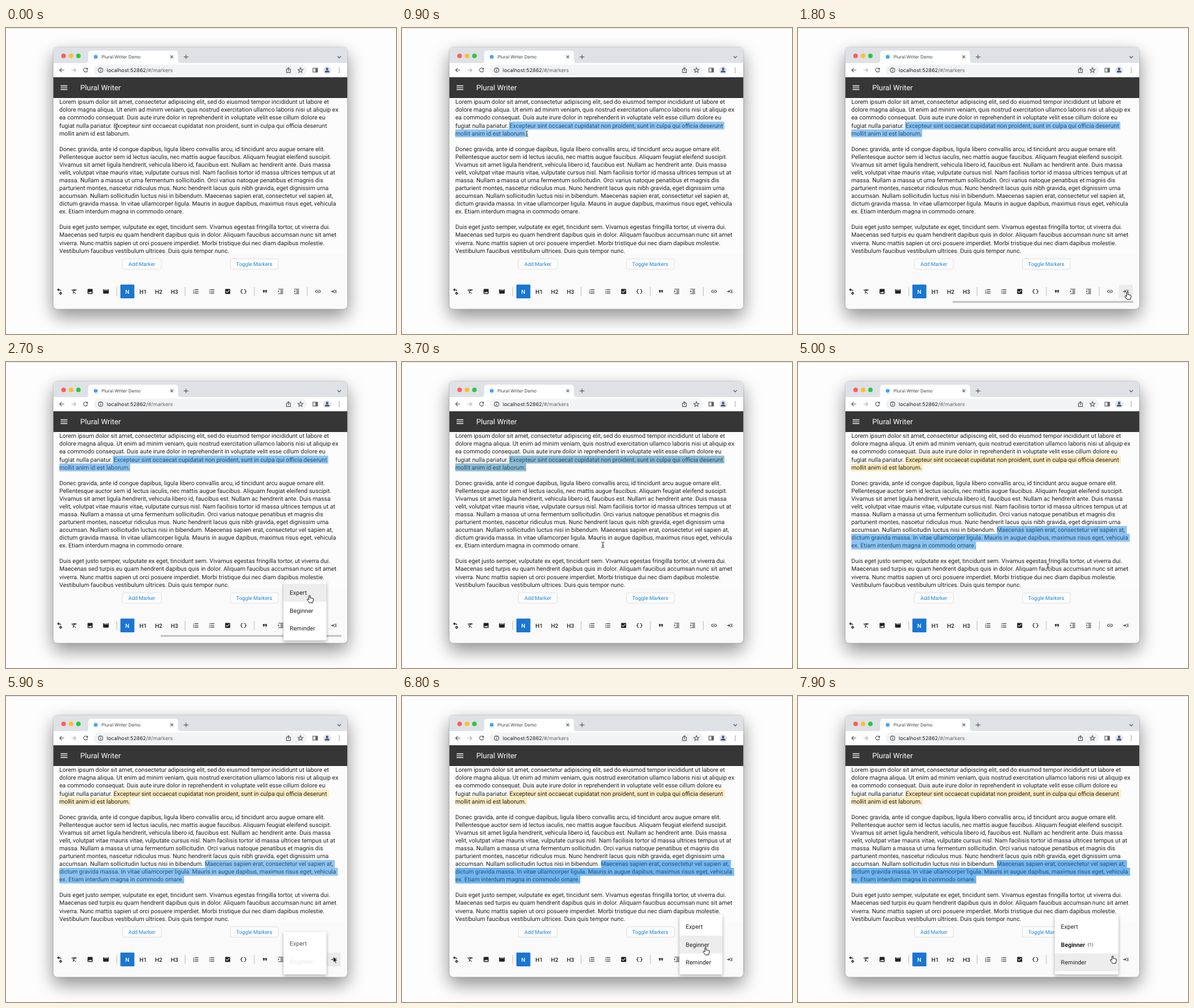
These frames come from a looping animation (600x472 px, 8 s). An HTML page:

```html
<!DOCTYPE html>
<html lang="en">
<head>
<meta charset="utf-8">
<title>Plural Writer Demo</title>
<style>
  html, body { margin: 0; width: 100%; height: 100%; overflow: hidden; background: #fdfdfd; }
  svg { display: block; text-rendering: geometricPrecision; font-family: Roboto, sans-serif; }
  .ui { font-family: Inter, sans-serif; }
  .line { fill: none; stroke: #5f6368; stroke-width: 1.1; }
  #win { filter: drop-shadow(0 11px 14px rgba(0,0,0,.36)) drop-shadow(0 0 1px rgba(0,0,0,.3)); }
  #panel { filter: drop-shadow(0 2px 2.5px rgba(0,0,0,.32)); }
  .btn { fill: #fcfcfc; stroke: #dcdcdc; stroke-width: .8; }
  .btnText { fill: #1e88e0; font-size: 8.05px; text-anchor: middle; }
</style>
</head>
<body>
<svg id="stage" width="600" height="472" viewBox="0 0 600 472">
  <rect width="600" height="1" fill="#e4e4e4"/>
  <rect id="win" x="73" y="30" width="452" height="403.5" rx="6" fill="#fafafa"/>

  <!-- browser chrome -->
  <path d="M73 54V36a6 6 0 0 1 6-6H519a6 6 0 0 1 6 6V54z" fill="#dee1e6"/>
  <circle cx="88.6" cy="43" r="3.5" fill="#fe5f57"/>
  <circle cx="100" cy="43" r="3.5" fill="#febc2e"/>
  <circle cx="111.4" cy="43" r="3.5" fill="#28c840"/>
  <path d="M121.500 54.500q5 0 5-5V40q0-5 5-5H259.500q5 0 5 5V49.500q0 5 5 5z" fill="#fff"/>
  <rect x="73" y="54" width="452" height="22" fill="#fff"/>
  <circle cx="138" cy="44.600" r="3" fill="#42a5f5"/>
  <text class="ui" x="147" y="47.200" font-size="6.8" fill="#3c4043">Plural Writer Demo</text>
  <path class="line" d="M253 42.500l4.200 4.200m0-4.200l-4.200 4.200M273.500 44.600h7m-3.500-3.500v7M510 43.500l2.600 2.600 2.600-2.600"/>
  <path class="line" d="M89.500 65h-7m3.200-3.200L82.500 65l3.200 3.200"/>
  <path class="line" d="M100.500 65h7m-3.200-3.200l3.200 3.200-3.200 3.200" style="stroke:#b4b7ba"/>
  <path class="line" d="M125.200 63.300a3.100 3.100 0 1 0 .3 2.200M125.600 61.400v2.300h-2.300"/>
  <rect x="135" y="56.500" width="328" height="17" rx="8.500" fill="#f1f3f4"/>
  <circle class="line" cx="145.500" cy="65" r="3.400" stroke-width="1"/>
  <path class="line" d="M145.500 64.600v2.300m0-4.300v1"/>
  <text class="ui" x="155" y="67.900" font-size="7.950" fill="#202124">localhost:52862<tspan fill="#5f6368">/#/markers</tspan></text>
  <path class="line" d="M432.800 63.600h-1.300v5h6v-5h-1.300M434.500 66.500v-5m-1.700 1.500l1.700-1.700 1.700 1.700"/>
  <path class="line" stroke-width=".9" d="M453 61.200l1.100 2.600 2.800.2-2.100 1.800.6 2.700-2.400-1.400-2.400 1.400.6-2.700-2.100-1.800 2.800-.2z"/>
  <rect class="line" x="472.200" y="62" width="7" height="6"/>
  <path d="M476 62h3.200v6H476z" fill="#5f6368"/>
  <circle cx="494" cy="65" r="6" fill="#dce3f5"/>
  <circle cx="494" cy="63.200" r="1.900" fill="#46506a"/>
  <path d="M490.200 68.600q0-3 3.800-3t3.800 3z" fill="#46506a"/>
  <path d="M512.600 62v.01m0 2.990v.01m0 2.990v.01" stroke="#5f6368" stroke-width="1.500" stroke-linecap="round"/>

  <!-- app bar -->
  <rect x="73" y="76" width="452" height="32" fill="#363636"/>
  <path d="M84 89.100h10.400M84 92h10.400M84 94.900h10.400" stroke="#fff" stroke-width="1.150"/>
  <text x="114.300" y="96.100" font-size="11.490" fill="#fff">Plural Writer</text>

  <!-- editor -->
  <rect x="73" y="108" width="452" height="241" fill="#fcfcfc"/>
  <path id="expert" fill="#fdecc0"/>
  <path id="beginner" fill="#c6e3fb"/>
  <g id="copy" font-size="9.190" fill="#212121"></g>
  <path id="selection" fill="rgb(25,135,228)" fill-opacity=".48"/>

  <rect class="btn" x="179" y="356" width="60" height="16" rx="2"/>
  <text class="btnText" x="209" y="367">Add Marker</text>
  <rect class="btn" x="345.500" y="356" width="73.500" height="16" rx="2"/>
  <text class="btnText" x="382" y="367">Toggle Markers</text>

  <!-- toolbar -->
  <rect id="hover" x="493.500" y="396" width="21.500" height="21" rx="1" fill="#ececec"/>
  <rect x="176" y="395.800" width="21.500" height="21.200" rx="1" fill="#1976d2"/>
  <path d="M170.500 399.500v14M275.500 399.500v14M382 399.500v14M463.500 399.500v14" stroke="#bdbdbd" stroke-width=".9"/>
  <path d="M79.500 403.800h3.200q1.600 0 1.600 2M81.300 402l-1.800 1.800 1.800 1.800M82.300 409.300l1.700-1.700 1.700 1.700-1.700 1.700z" fill="none" stroke="#212121" stroke-width="1.200"/>
  <g id="icons" fill="#212121"></g>
  <g id="styles" font-size="8.800" font-weight="500" fill="#212121" text-anchor="middle"></g>
  <rect id="scroll" x="238" y="421" width="278" height="3" fill="#c6c6c6"/>

  <!-- popup menu -->
  <g id="menu">
    <rect id="panel" rx="1.500" fill="#fff"/>
    <svg id="view">
      <rect id="row" width="100" height="27.550" fill="#ededed"/>
      <g id="items" font-size="9.190" fill="#212121"></g>
    </svg>
  </g>

  <!-- pointers, tip or centre at 0,0 -->
  <g id="pointer">
    <g id="beam" fill="none" stroke-linecap="round">
      <path id="beamPath" d="M-1.800-4.300Q0-4.300 0-3.200V3.200Q0 4.300-1.800 4.300M1.800-4.300Q0-4.300 0-3.200M0 3.200Q0 4.300 1.800 4.300M-1 1h2" stroke="#fff" stroke-width="2"/>
      <use href="#beamPath" style="stroke:#111"/>
      <path d="M-1.800-4.300Q0-4.300 0-3.200V3.200Q0 4.300-1.800 4.300M1.800-4.300Q0-4.300 0-3.200M0 3.200Q0 4.300 1.800 4.300M-1 1h2" stroke="#111" stroke-width=".8"/>
    </g>
    <path id="arrow" d="M0 0V9.200L2.100 7.200 3.500 10.400 5 9.700 3.600 6.600H6.500z" fill="#111" stroke="#fff" stroke-width=".7"/>
    <path id="hand" d="M-1 .9Q-.9-.1 0-.1T1 .9V4q1-.8 1.700.2 1-.5 1.600.4 1.600-.3 1.600 1.400 0 2.500-1 3.700V11.300H-.3Q-1 9.800-3.400 7.300q-.8-1.400.5-1.700Q-2 5.600-1 6.700z" fill="#fff" stroke="#111" stroke-width=".9"/>
  </g>
</svg>
<script>
const LOOP = 8000, LEFT = 82, TOP = 108.2, PITCH = 12.07, ROW = 27.55;
const $ = id => document.getElementById(id);
const clamp = v => Math.max(0, Math.min(1, v));
const set = (el, attrs) => { for (const k in attrs) el.setAttribute(k, attrs[k]); };
function add(parent, tag, attrs, text = '') {
  const el = document.createElementNS('http://www.w3.org/2000/svg', tag);
  set(el, attrs);
  el.textContent = text;
  return $(parent).appendChild(el);
}

const copy = `Lorem ipsum dolor sit amet, consectetur adipiscing elit, sed do eiusmod tempor incididunt ut labore et
dolore magna aliqua. Ut enim ad minim veniam, quis nostrud exercitation ullamco laboris nisi ut aliquip ex
ea commodo consequat. Duis aute irure dolor in reprehenderit in voluptate velit esse cillum dolore eu
fugiat nulla pariatur. Excepteur sint occaecat cupidatat non proident, sunt in culpa qui officia deserunt
mollit anim id est laborum.

Donec gravida, ante id congue dapibus, ligula libero convallis arcu, id tincidunt arcu augue ornare elit.
Pellentesque auctor sem id lectus iaculis, nec mattis augue faucibus. Aliquam feugiat eleifend suscipit.
Vivamus sit amet ligula hendrerit, vehicula libero id, faucibus est. Nullam ac hendrerit ante. Duis massa
velit, volutpat vitae mauris vitae, vulputate cursus nisl. Nam facilisis tortor id massa ultrices tempus ut at
massa. Nullam a massa ut urna fermentum sollicitudin. Orci varius natoque penatibus et magnis dis
parturient montes, nascetur ridiculus mus. Nunc hendrerit lacus quis nibh gravida, eget dignissim urna
accumsan. Nullam sollicitudin luctus nisi in bibendum. Maecenas sapien erat, consectetur vel sapien at,
dictum gravida massa. In vitae ullamcorper ligula. Mauris in augue dapibus, maximus risus eget, vehicula
ex. Etiam interdum magna in commodo ornare.

Duis eget justo semper, vulputate ex eget, tincidunt sem. Vivamus egestas fringilla tortor, ut viverra dui.
Maecenas sed turpis eu quam hendrerit dapibus quis in dolor. Aliquam faucibus accumsan nunc sit amet
viverra. Nunc mattis sapien ut orci posuere imperdiet. Morbi tristique dui nec diam dapibus molestie.
Vestibulum faucibus vestibulum ultrices. Duis quis tempor nunc.`;
copy.split('\n').forEach((s, i) => add('copy', 'text', { x: LEFT, y: TOP + 9.1 + PITCH * i }, s));

// 24-unit icons, keyed by centre x
const bars = 'M3 21h18v-2H3zM3 3v2h18V3zM11 17h10v-2H11zM11 9h10V7H11zM11 13h10v-2H11z';
const rules = 'M7 5v2h14V5zM7 19h14v-2H7zM7 13h14v-2H7z';
const icons = {
  105: 'M3.270 5L2 6.270l6.970 6.970L6.500 19h3l1.570-3.660L16.730 21 18 19.730 3.270 5zM6 5v.18L8.820 8h2.400l-.72 1.680 2.100 2.100L14.210 8H20V5z',
  129.4: 'M21 19V5c0-1.100-.9-2-2-2H5c-1.100 0-2 .9-2 2v14c0 1.100.9 2 2 2h14c1.100 0 2-.9 2-2zM8.500 13.500l2.500 3L14.500 12l4.500 6H5z',
  153.7: 'M18 4l2 4h-3l-2-4h-2l2 4h-3l-2-4H8l2 4H7L5 4H4c-1.100 0-2 .9-2 2v12c0 1.100.9 2 2 2h16c1.100 0 2-.9 2-2V4z',
  292.2: rules + 'M2 17h2v.5H3v1h1v.5H2v1h3v-4H2zM3 8h1V4H2v1h1zM2 11h1.800L2 13.100v.9h3v-1H3.200L5 10.900V10H2z',
  316.6: rules + [6, 12, 18].map(y => `M2.500 ${y}a1.500 1.500 0 1 0 3 0a1.500 1.500 0 1 0-3 0`).join(''),
  341: 'M19 3H5c-1.100 0-2 .9-2 2v14c0 1.100.9 2 2 2h14c1.100 0 2-.9 2-2V5c0-1.100-.9-2-2-2zm-9 14l-5-5 1.410-1.410L10 14.170l7.590-7.590L19 8z',
  365.3: 'M10 4H7Q4 4 4 7v2q0 1-2 1v4q2 0 2 1v2q0 3 3 3h3v-2H7q-1 0-1-1v-2q0-2-1.600-3Q6 11 6 9V7q0-1 1-1h3zM14 4h3q3 0 3 3v2q0 1 2 1v4q-2 0-2 1v2q0 3-3 3h-3v-2h3q1 0 1-1v-2q0-2 1.600-3Q18 11 18 9V7q0-1-1-1h-3z',
  398.3: 'M6 17h3l2-4V7H5v6h3zM14 17h3l2-4V7h-6v6h3z',
  422.6: bars + 'M3 8v8l4-4z',
  447: bars + 'M3 12l4 4V8z',
  480: 'M3.900 12c0-1.710 1.390-3.100 3.100-3.100h4V7H7a5 5 0 0 0 0 10h4v-1.900H7c-1.710 0-3.100-1.390-3.100-3.100zM8 13h8v-2H8zM17 7h-4v1.900h4a3.100 3.100 0 0 1 0 6.200h-4V17h4a5 5 0 0 0 0-10z',
  504.3: 'M13 7h9v2h-9zM13 15h9v2h-9zM16 11h6v2h-6zM13 12L8 7v4H2v2h6v4z'
};
for (const x in icons)
  add('icons', 'path', { d: icons[x], transform: `translate(${x - 5.17} 401.2) scale(.431)` });

['N', 'H1', 'H2', 'H3'].forEach((s, i) =>
  add('styles', 'text', { x: 186.6 + 24.2 * i, y: 409.8, fill: i ? '#212121' : '#fff' }, s));

const items = ['Expert', 'Beginner', 'Reminder'].map((s, i) =>
  add('items', 'text', { x: 9.6, y: 21.6 + ROW * i }, s));
const count = add('items', 'text', { x: 50.5, y: 20.8 + ROW, 'font-size': 6.9 }, '(1)');

// pointer path: time, x, y
const path = [
  [0, 170, 152], [300, 165, 151], [400, 165, 151], [800, 192, 163], [1000, 192, 163],
  [1500, 523, 402], [1750, 506.5, 407.5], [2300, 506.5, 407.5], [2650, 467, 360], [2950, 467, 360],
  [3600, 309, 282], [3800, 309, 282], [4300, 308, 265.4], [4500, 306.500, 259], [4700, 306.500, 259],
  [5400, 503.500, 402], [6150, 503.500, 402], [6500, 467, 388], [6800, 467, 388],
  [7150, 503.500, 404], [7500, 503.500, 404], [7850, 484, 401], [LOOP, 484, 401]
];
function pointerAt(t) {
  const i = path.findIndex(k => k[0] > t);
  const [t0, x0, y0] = path[i - 1], [t1, x1, y1] = path[i];
  const u = (t - t0) / (t1 - t0), e = u * u * (3 - 2 * u);
  return [x0 + (x1 - x0) * e, y0 + (y1 - y0) * e];
}

const lineEnd = { 3: 495.8, 4: 191, 12: 505.8, 13: 510.5, 14: 274 };
const lineAt = y => Math.floor((y - TOP) / PITCH);
// outline of the text from x0 on line a to x1 on line b
function range(x0, a, x1, b, pad = 0) {
  let d = '';
  for (let n = a; n <= b; n++) {
    const l = n === a ? x0 : LEFT, r = (n === b ? x1 : lineEnd[n]) + pad;
    if (r > l) d += `M${l} ${TOP + PITCH * n}H${r}v${PITCH}H${l}z`;
  }
  return d;
}
function selectionAt(t, x, y) {
  if (t < 400) return '';
  if (t < 800) return range(164.5, 3, Math.max(x, 164.5), lineAt(y));
  if (t < 3750) return range(164.5, 3, 191, 4);
  if (t >= 4500) return range(306.5, 12, 274, 14);
  const n = lineAt(y);
  return range(Math.min(x, lineEnd[n]), n, 274, 14);
}

const menus = [
  { open: 1950, close: 2900, width: 66 },
  { open: 5758, close: 6720, width: 66 },
  { open: 7250, close: Infinity, width: 98 }
];
function drawMenu(t, x, y) {
  const m = menus.findLast(m => t >= m.open) || menus[0];
  const p = t < m.close ? clamp((t - m.open) / 300) : clamp(1.5 * (1 - (t - m.close) / 300));
  const unit = 1 / 4.5, wide = m.width > 66;
  const width = m.width * clamp(p / unit), height = 92 * clamp(p / unit / 3);
  const box = { x: 493 - width, y: Math.min(396, 429.5 - height), width, height };
  set($('panel'), box);
  set($('view'), box);
  $('menu').style.opacity = clamp(p * 3);
  items.forEach((el, i) => el.style.opacity = clamp((p - unit * (i + 1)) / (1.5 * unit)));
  set(items[1], { 'font-weight': wide ? 700 : 400 });
  count.style.opacity = wide ? items[1].style.opacity : 0;
  const row = p === 1 && x > box.x && x < 493 ? Math.floor((y - box.y - 4.6) / ROW) : -1;
  const over = row >= 0 && row < 3;
  $('row').style.opacity = over ? 1 : 0;
  set($('row'), { y: 4.6 + ROW * row });
  return { shown: p > 0, over };
}

function draw(t) {
  const [x, y] = pointerAt(t);
  const menu = drawMenu(t, x, y);
  const onMarker = x > 493.5 && x < 515 && y > 396 && y < 417;
  set($('expert'), { d: t < 2900 ? '' : range(165, 3, 191, 4, 1) });
  set($('beginner'), { d: t < 6720 ? '' : range(306.5, 12, 274, 14, 0.8) });
  set($('selection'), { d: selectionAt(t, x, y) });
  $('hover').style.opacity = onMarker ? 1 : 0;
  $('scroll').style.opacity = clamp((t - 1450) / 200) * clamp((3300 - t) / 300);

  const kind = menu.shown ? (menu.over ? 'hand' : 'arrow')
    : onMarker ? 'hand' : y < 349 ? 'beam' : 'arrow';
  for (const id of ['beam', 'arrow', 'hand']) $(id).style.display = id === kind ? '' : 'none';
  set($('pointer'), { transform: `translate(${x} ${y})` });
}

const start = performance.now();
(function tick() {
  draw((performance.now() - start) % LOOP);
  requestAnimationFrame(tick);
})();
</script>
</body>
</html>
```
